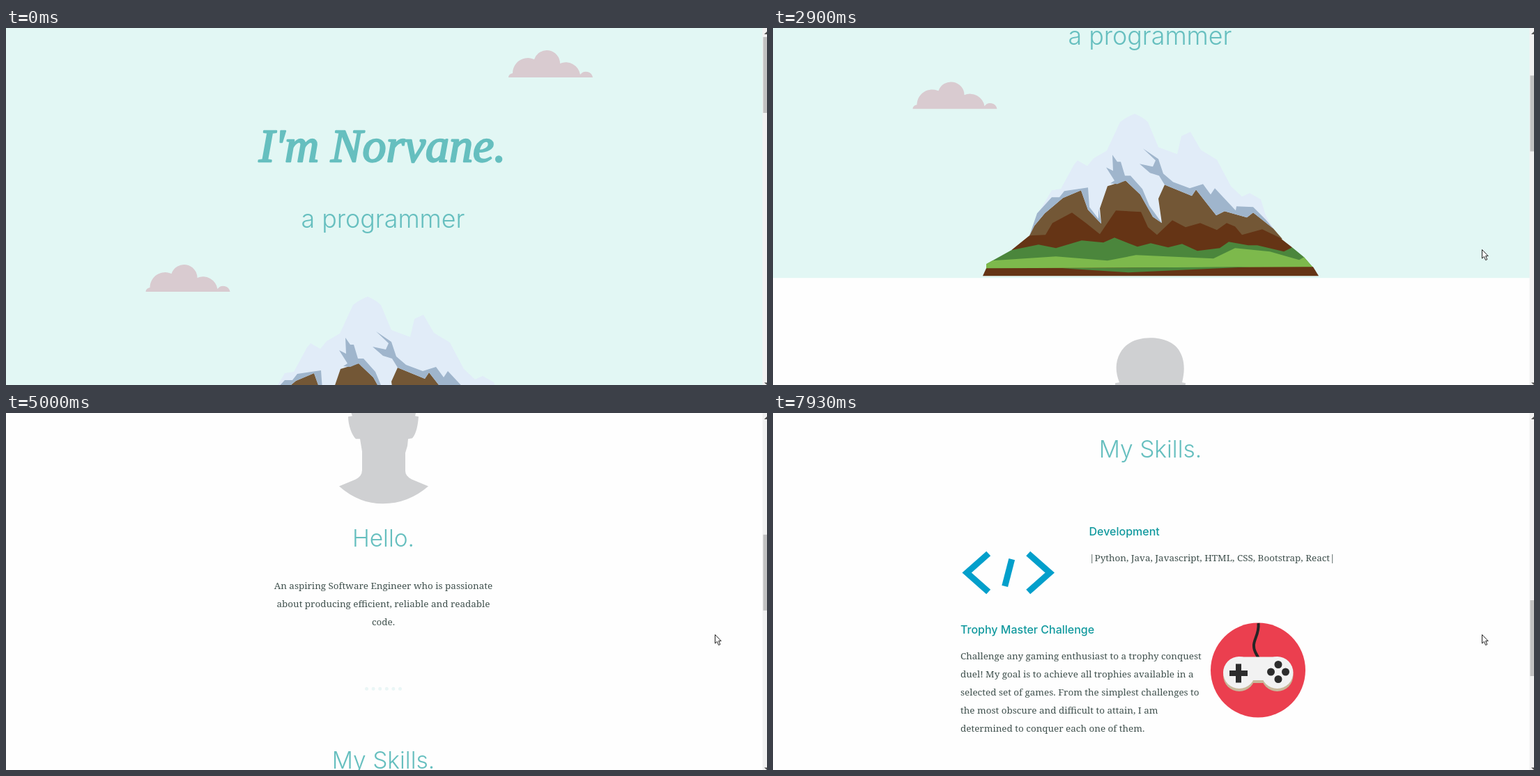
These frames come from a looping animation (1092 by 513 pixels, 7990 ms). An HTML page:

```html
<!DOCTYPE html>
<html lang="en">
<head>
<meta charset="utf-8">
<title>Personal page</title>
<style>
html, body { margin: 0; width: 100%; height: 100%; overflow: hidden; background: #fefefe; }
svg { display: block; width: 1092px; height: 513px; }
.mid { text-anchor: middle; }
.name { font: italic 68px "Liberation Serif", serif; fill: #66bfbf; stroke: #66bfbf; stroke-width: 2.4; stroke-linejoin: round; }
.h2 { font: 300 33.5px Inter, sans-serif; fill: #66bfbf; }
.h3 { font: 500 16px Inter, sans-serif; fill: #11999e; }
.body { font: 13.45px "Noto Serif", serif; fill: #40514e; }
.code { fill: none; stroke: #029fcb; stroke-width: 9; }
</style>
</head>
<body>
<svg viewBox="0 0 1092 513">
  <defs>
    <path id="cloud" fill="#d9cbd0" d="M721 71a7 6 0 0 1 6-6A22 22 0 0 1 758 45A19 19 0 0 1 795 51A21 21 0 0 1 824 67A10 10 0 0 1 842 71Z"/>
    <g id="pad">
      <circle cx="669" cy="373" r="23"/>
      <circle cx="723.5" cy="373" r="23"/>
      <path d="M667 350.5H725V384H667Z"/>
    </g>
  </defs>

  <g id="page">
    <path fill="#e2f7f4" d="M0 0H1092V622H0Z"/>
    <use href="#cloud"/>
    <use href="#cloud" x="-520.5" y="308"/>
    <text class="name mid" x="540" y="192">I'm Norvane.</text>
    <text class="h2 mid" x="541" y="287" style="font-size:35.8px">a programmer</text>

    <g transform="translate(0 162)">
      <path fill="#e1ecf8" d="M368 399L381 366L400 334L413 332L432 297L437 291L451 299L460 288L479 277L498 236Q506 229 519 224Q531 229 538 236L553 272L580 282L586 256L599 250L614 276L637 290L657 328L673 343L684 338L700 347L707 370L718 389Z"/>
      <path fill="#735736" d="M368 399L375 385L390 367L416 345L442 334L452 362L471 382L469 360L480 328L506 320L527 340L545 372L558 381L553 346L562 326L601 342L607 333L636 370L648 364L680 373L689 366L718 389L731 404L560 420H400Z"/>
      <g fill="#9fb5cc">
        <path d="M368 399L379 367L400 344L411 344L418 335L452 330L454 358L467 375V360L471 382L452 362L442 334L416 345L390 367L375 385Z"/>
        <path d="M478 301L488 306L487 283L494 293H499L505 313H513L530 332L540 356L558 381L545 372L527 340L506 320L494 325L484 324L490 320Z"/>
        <path d="M531 274L553 289L560 310L574 322L598 331L617 325L628 340L634 331L664 363L665 357L689 358L707 376L718 389L689 366L680 373L648 364L636 370L607 333L601 342L562 326L554 313L541 309L526 296L545 300L549 291Z"/>
      </g>
      <path fill="#653415" d="M342 420L368 399L391 398L401 381L429 366L449 381L469 397L492 363L528 365L538 387L551 398L573 377L592 387L613 381L637 391L651 381L663 386L673 398L702 390L727 402L745 416L740 424Z"/>
      <path fill="#4b863c" d="M306 440L342 420L381 412L406 417L443 406L474 409L490 402L523 415L542 410L567 416L587 411L609 421L641 417L654 408L682 413L695 413L733 422L745 416L762 430L775 445L306 446Z"/>
      <path fill="#7db94c" d="M306 440L315 435L406 429L480 435L521 427L632 432L663 417L713 422L755 434L762 430L775 445L306 447Z"/>
      <path fill="#653415" d="M306 446L775 444L783 457H301Z"/>
      <path fill="#4b863c" d="M415 446L684 444L510 452Z"/>
    </g>

    <path transform="translate(0 567)" fill="#cfd0d2" d="M542 141C560 141 576 148 582 158C590 170 592 185 587 205L592 206C591 218 589 230 583 237L577 238L576 248L573 258V284Q573 291 582 296L606 306Q577 331 541 331Q506 331 478 306L502 296Q511 291 511 283V256L508 238H502C496 232 491 218 491 206L497 205C491 190 491 176 498 163C506 148 522 141 542 141Z"/>
    <text class="h2 mid" x="541.5" y="960">Hello.</text>
    <g class="body mid">
      <text x="541.5" y="1021">An aspiring Software Engineer who is passionate</text>
      <text x="541.5" y="1047">about producing efficient, reliable and readable</text>
      <text x="541.5" y="1073">code.</text>
    </g>
    <path stroke="#eaf6f6" stroke-width="5" stroke-linecap="round" stroke-dasharray="0 9.6" d="M517.5 1164H566"/>

    <text class="h2 mid" x="541.5" y="1279">My Skills.</text>
    <text class="h3" x="453.5" y="1391">Development</text>
    <text class="body" x="454" y="1427.5">|Python, Java, Javascript, HTML, CSS, Bootstrap, React|</text>
    <g class="code" transform="translate(337.7 1444.5)">
      <path d="M-28.5-27.5L-59.5 0L-28.5 27.5M28.5-27.5L59.5 0L28.5 27.5"/>
      <path id="slash"/>
    </g>

    <text class="h3" x="269" y="1531.5">Trophy Master Challenge</text>
    <g class="body">
      <text x="269" y="1568.5">Challenge any gaming enthusiast to a trophy conquest</text>
      <text x="269" y="1594.5">duel! My goal is to achieve all trophies available in a</text>
      <text x="269" y="1620.5">selected set of games. From the simplest challenges to</text>
      <text x="269" y="1646.5">the most obscure and difficult to attain, I am</text>
      <text x="269" y="1672.5">determined to conquer each one of them.</text>
    </g>
    <g transform="translate(0 1215)">
      <circle cx="696" cy="369.5" r="68" fill="#eb3f4f"/>
      <path fill="none" stroke="#252525" stroke-width="4" d="M696.5 302C698 318 689 326 690 335C690 343 694 346 697 353"/>
      <use href="#pad" y="4" fill="#c8b89a"/>
      <use href="#pad" fill="#f2f2f2"/>
      <path stroke="#2d2d2d" stroke-width="8" d="M655 374H681M668 360.5V387.5"/>
      <g fill="#2d2d2d">
        <circle cx="725" cy="361.5" r="5.5"/><circle cx="725" cy="382.5" r="5.5"/>
        <circle cx="714.5" cy="372" r="5.5"/><circle cx="735.5" cy="372" r="5.5"/>
      </g>
    </g>
  </g>

  <path fill="#f1f1f1" d="M1085.5 0H1092V513H1085.5Z"/>
  <path fill="#505050" d="M1088 9L1092 5V9ZM1088 509.5H1092V513Z"/>
  <rect id="thumb" x="1086.5" width="5.5" height="109" fill="#c1c1c1"/>
  <path id="cursor" fill="#fff" stroke="#222" d="M.5.5V13L3.4 10.4L5.6 15.5L7.8 14.6L5.6 9.6H9.2Z"/>
</svg>
<script>
const LOOP = 7990, NOTCH = 81;
// Wheel gestures: start, end, notches
const wheel = [
  [1840, 2240, 2], [2390, 2640, 1], [2840, 3030, 1], [3230, 3500, 1], [3580, 3910, 2],
  [4050, 4330, 1], [4520, 4730, 1], [4870, 5140, 1], [5420, 5600, 1],
  [6140, 6410, 1], [6720, 6940, 1], [7210, 7470, 1], [7550, 7930, 1]
];
// Pointer path: time, x, y
const pointer = [
  [120, 936, 358], [480, 735, 228], [670, 722, 185], [890, 649, 248],
  [1030, 649, 248], [1360, 878, 298], [1500, 1017, 318]
];
const [page, slash, thumb, cursor] =
  ["page", "slash", "thumb", "cursor"].map(id => document.getElementById(id));

const progress = (t, a, b) => Math.min(1, Math.max(0, (t - a) / (b - a)));
const smooth = p => p * p * (3 - 2 * p);

function pointerAt(t) {
  let [, x, y] = pointer[0];
  for (let i = 1; i < pointer.length; i++) {
    const [t0, x0, y0] = pointer[i - 1], [t1, x1, y1] = pointer[i];
    const p = progress(t, t0, t1);
    x += (x1 - x0) * p;
    y += (y1 - y0) * p;
  }
  return `translate(${x} ${y})`;
}

function draw(t) {
  const scroll = wheel.reduce((sum, [a, b, n]) => sum + n * NOTCH * smooth(progress(t, a, b)), 0);
  page.setAttribute("transform", `translate(0 ${-scroll})`);
  thumb.setAttribute("y", 13 + scroll * 0.2107);

  // The slash swings while it grows, then shrinks back
  const grow = progress(t, 5900, 6060), shrink = progress(t, 6640, 6760);
  const half = 20 + 39 * (smooth(grow) - smooth(shrink));
  slash.setAttribute("d", `M0 ${-half}V${half}`);
  slash.setAttribute("transform", `rotate(${14.5 + 28 * Math.sin(2 * Math.PI * grow)})`);

  cursor.setAttribute("visibility", t < 120 ? "hidden" : "visible");
  cursor.setAttribute("transform", pointerAt(t));
}

function tick() {
  draw(performance.now() % LOOP);
  requestAnimationFrame(tick);
}
tick();
</script>
</body>
</html>
```
